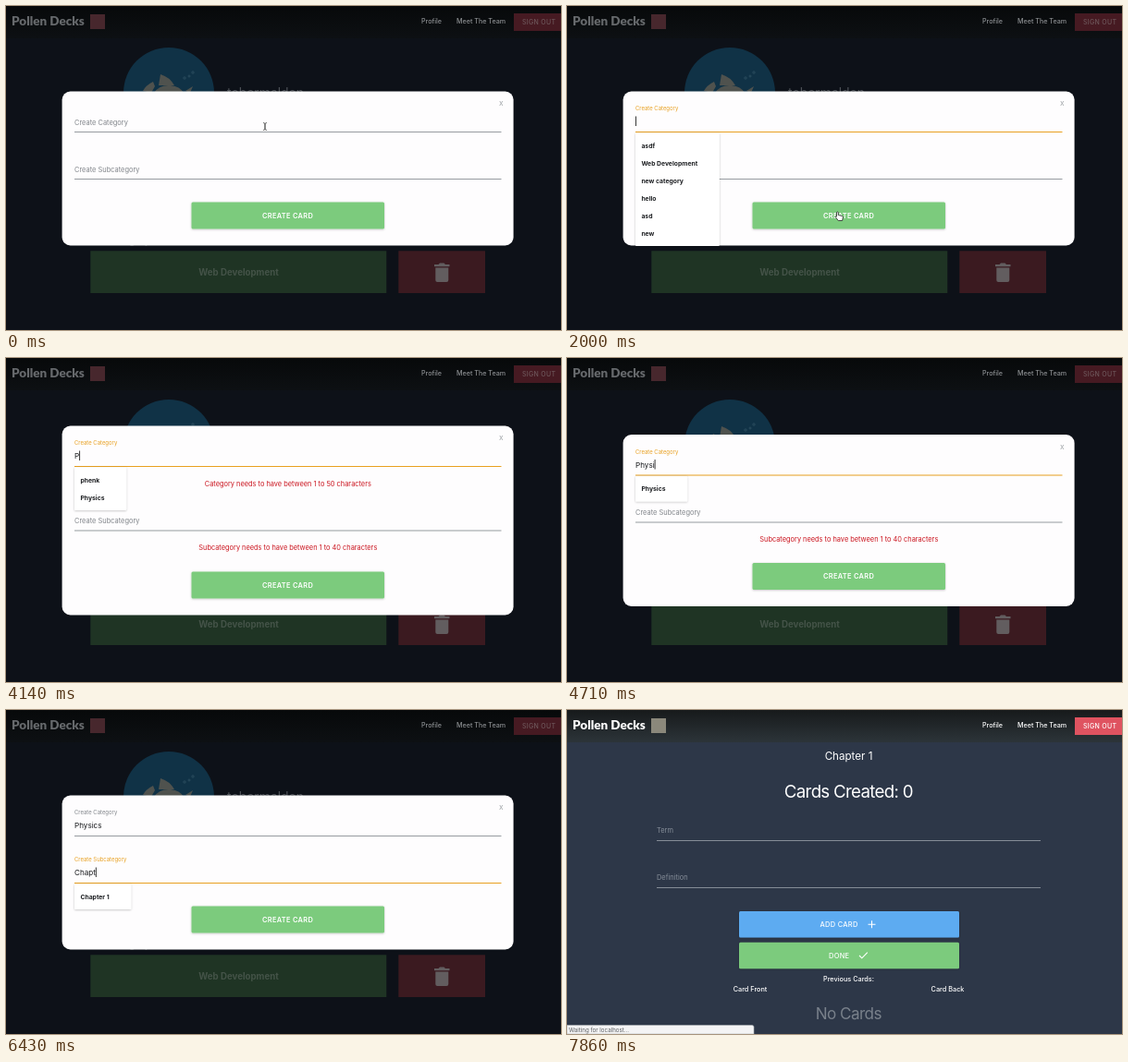
Recreate the animation shown at these times as an HTML page. Size 600 by 351 pixels, loop 8 s.

```html
<!DOCTYPE html>
<html lang="en">
<head>
<meta charset="utf-8">
<title>Create a card</title>
<style>
html, body { margin: 0; width: 100%; height: 100%; overflow: hidden; background: #0d1118; }
svg { display: block; width: 100%; height: 100%; font-family: Inter, "Open Sans", sans-serif; font-size: 7.45px; }
.logo { font: 900 13.5px Lato, sans-serif; }
.nav { font-size: 7.15px; font-weight: 500; }
.caps { font-weight: 500; letter-spacing: .3px; }
.mid { text-anchor: middle; }
.input { font-size: 8.1px; white-space: pre; fill: #16181b; }
.error { font-size: 7.4px; fill: #cb1620; }
.list { font-size: 6.8px; font-weight: 700; fill: #1d1f22; }
</style>
</head>
<body>
<svg id="stage" viewBox="0 0 600 351">
  <defs>
    <linearGradient id="bar" x2="0" y2="1"><stop stop-color="#171a1b"/><stop offset="1" stop-color="#2c3439"/></linearGradient>
    <linearGradient id="barDim" x2="0" y2="1"><stop stop-color="#07090a"/><stop offset="1" stop-color="#0d1013"/></linearGradient>
    <filter id="shade" x="-10%" y="-20%" width="120%" height="150%"><feDropShadow dx="0" dy=".6" stdDeviation=".8" flood-opacity=".26"/></filter>
  </defs>

  <g id="home">
    <rect width="600" height="351" fill="#0d1118"/>
    <rect width="600" height="35" fill="url(#barDim)"/>
    <text class="logo" x="6" y="21" fill="#66696c">Pollen Decks</text>
    <rect x="91" y="9" width="16" height="16" fill="#47272d"/>
    <g class="nav" fill="#8b8e91"><text x="449" y="19.4">Profile</text><text x="487" y="19.4">Meet The Team</text></g>
    <rect x="549" y="8" width="51" height="19" fill="#461a22"/>
    <text class="caps" style="font-size:7px" x="558" y="20" fill="#6d565a">SIGN OUT</text>
    <circle cx="176" cy="94" r="49" fill="#103246"/>
    <path d="M167 74q10 3 15 12h-17zM148 92q3-6 11-10l2 5-4 7zM160 94q6-9 18-8 10 1 14 8zM194 92l8-5-3 7z" fill="#4f524e"/>
    <g fill="none" stroke="#2f5163" stroke-width=".8"><circle cx="193" cy="78" r="1.2"/><circle cx="198" cy="76" r="1"/><circle cx="202" cy="72" r="1.2"/></g>
    <text x="239" y="98.8" font-size="13.9" fill="#4d5157">tobermalden</text>
    <text x="110" y="258.3" font-size="10.5" fill="#4a4e53">Category</text>
    <rect x="91.300" y="265.300" width="320" height="45.700" fill="#1f3424"/>
    <text class="mid" x="251.5" y="292" font-size="9.7" font-weight="700" fill="#445348">Web Development</text>
    <rect x="424.300" y="265.300" width="93.700" height="45.700" fill="#3b1a20"/>
    <path d="M463 280h4.500l1.500-1.500h4.500l1.500 1.500h4.500v2.200h-16.500zM464.300 283.500h14v13.500q0 2-2 2h-10q-2 0-2-2z" fill="#625d5f"/>
  </g>

  <g id="modal">
    <rect id="panel" x="60.600" width="488" rx="9" fill="#fefdfe"/>
    <text id="close" class="mid" x="535.3" font-size="8.5" fill="#a3a7ab">x</text>
    <g id="fields"></g>
    <g id="create">
      <rect x="200.500" width="208.500" height="29" rx="1.500" fill="#7ccb7d" filter="url(#shade)"/>
      <text class="caps mid" style="font-weight:600" x="304.600" y="17.300" fill="#fff">CREATE CARD</text>
    </g>
    <g id="drop" class="list"></g>
  </g>

  <g id="deck">
    <rect width="600" height="351" fill="#2d3748"/>
    <rect width="600" height="35" fill="url(#bar)"/>
    <text class="logo" x="6" y="21" fill="#fff">Pollen Decks</text>
    <rect x="91" y="9" width="16" height="16" fill="#8b887b"/>
    <g class="nav" fill="#fff"><text x="449" y="19.400">Profile</text><text x="487" y="19.400">Meet The Team</text></g>
    <rect x="549" y="8" width="51" height="19" fill="#df5360"/>
    <text class="caps" style="font-size:7px" x="558" y="20" fill="#fff">SIGN OUT</text>
    <g class="mid" fill="#fff">
      <text x="304.500" y="54" font-size="11.600">Chapter 1</text>
      <text x="304.300" y="94.800" font-size="18.700" letter-spacing="-.7">Cards Created: 0</text>
    </g>
    <g fill="#868e99"><text x="97" y="133.400">Term</text><text x="97" y="184.200">Definition</text></g>
    <path d="M97 141.500h415M97 192.500h415" stroke="#858d97"/>
    <g filter="url(#shade)">
      <rect x="186" y="218" width="238" height="28.500" rx="1.500" fill="#5dabf1"/>
      <rect x="186" y="251.700" width="238" height="28.500" rx="1.500" fill="#7ccb7d"/>
    </g>
    <g class="caps" fill="#fff"><text x="273.500" y="235">ADD CARD</text><text x="283" y="268.800">DONE</text></g>
    <path d="M325.500 232.300h8M329.500 228.300v8M316 266l2.800 2.800 6-6.200" fill="none" stroke="#fff" stroke-width="1.100"/>
    <g class="mid" font-weight="500" font-size="7.300" fill="#fff">
      <text x="304.500" y="294">Previous Cards:</text><text x="198" y="304.800">Card Front</text><text x="411.500" y="304.800">Card Back</text>
    </g>
    <text class="mid" x="304.300" y="335" font-size="17.100" letter-spacing="-.55" fill="#79818b">No Cards</text>
    <path d="M0 341.500h200q2 0 2 2V351H0z" fill="#f4f4f5" stroke="#aeb2b6" stroke-width=".6"/>
    <text x="2" y="349" font-size="6.200" fill="#5c5f62">Waiting for localhost...</text>
  </g>

  <path id="beam" d="M-2-4q2 0 2 1.500v5q0 1.500-2 1.500M2-4q-2 0-2 1.500v5q0 1.500 2 1.500" fill="none" stroke="#333" stroke-width=".7"/>
  <path id="hand" d="M-2.500-4.500q1-1 1.800 0v3l4.200 1q1 .4.900 1.500l-.8 3.500h-4.300l-3.200-4q.2-1.300 1.400-.4z" fill="#fff" stroke="#222" stroke-width=".8"/>
</svg>
<script>
const LOOP = 8000, SWITCH = 7860, ERR = 19;
const $ = id => document.getElementById(id);

// step tables: [ms, value]
const catKeys = [[0, ""], [4000, "P"], [4290, "Ph"], [4430, "Phy"], [4570, "Phys"], [4710, "Physi"], [4860, "Physic"], [5000, "Physics"]];
const subKeys = [[0, ""], [5570, "C"], [5860, "Ch"], [6000, "Cha"], [6140, "Chap"], [6430, "Chapt"], [6860, "Chapte"], [7000, "Chapter"], [7290, "Chapter "], [7430, "Chapter 1"]];
const catError = [[0, 0], [2290, 1], [4290, 0]];
const subError = [[0, 0], [2290, 1], [5860, 0]];
const all = ["asdf", "Web Development", "new category", "hello", "asd", "new"];
const lists = [[0, []], [860, all], [2140, []], [4000, ["phenk", "Physics"]], [4430, ["Physics"]], [5140, []],
  [5570, ["card", "Chapter 1"]], [5860, ["Chapter 1"]]];
const focusStarts = [[0, 0], [570, 570], [2570, 2570], [5140, 5140]];

// eased tables: [ms, value, ...]
const catFocus = [[0, 0], [570, 0], [770, 1], [2140, 1], [2290, 0], [2570, 0], [2770, 1], [5140, 1], [5340, 0]];
const catFloat = [[0, 0], [570, 0], [770, 1], [2140, 1], [2290, 0], [2570, 0], [2770, 1]];
const subFocus = [[0, 0], [5140, 0], [5340, 1]];
const catBlush = [[0, 0], [2430, 0], [2570, 1], [2770, 0]];
const mouse = [[0, 280, 130.500], [140, 280, 130.500], [290, 270, 128], [1290, 270, 128], [1860, 294, 228], [2290, 294, 228],
  [2560, 268, 101], [3290, 268, 101], [4000, 262, 104]];

const step = (table, t) => table.findLast(k => k[0] <= t);
const held = (table, t) => step(table, t)[1];
const lerp = (a, b, k) => a + (b - a) * k;
const mix = (a, b, k) => `rgb(${a.map((v, i) => Math.round(lerp(v, b[i], k)))})`;

function ease(table, t) {
  const i = table.findLastIndex(k => k[0] <= t), a = table[i], b = table[i + 1] || a;
  const u = a === b ? 0 : (t - a[0]) / (b[0] - a[0]), k = u * u * (3 - 2 * u);
  return a.slice(1).map((v, n) => lerp(v, b[n + 1], k));
}

function set(el, attrs) {
  for (const name in attrs) el.setAttribute(name, attrs[name]);
}

function makeField(name, limit) {
  const g = document.createElementNS("http://www.w3.org/2000/svg", "g");
  g.innerHTML = `<text x="74">Create ${name}</text><text class="input" x="74" y="35"></text>
    <rect x="74" y="43" width="461.5" height="1"/><rect width=".9" height="10.5" y="26.5" fill="#222"/>
    <text class="error mid" x="304.8" y="64.6">${name} needs to have between 1 to ${limit} characters</text>`;
  $("fields").append(g);
  const [label, input, line, caret, error] = g.children;
  return { g, label, input, line, caret, error };
}

const cat = makeField("Category", 50), sub = makeField("Subcategory", 40);
const grey = [128, 133, 138], rule = [150, 155, 160], amber = [232, 160, 32], rose = [224, 140, 132];

function drawField(f, y, s) {
  set(f.g, { transform: `translate(0 ${y})` });
  set(f.label, { y: lerp(35.6, 20.2, s.float), "font-size": lerp(7.45, 5.95, s.float), fill: mix(grey, amber, s.focus) });
  if (f.input.textContent !== s.text) f.input.textContent = s.text;
  set(f.line, { fill: s.blush ? mix(rule, rose, s.blush) : mix(rule, amber, s.focus) });
  const w = s.text ? f.input.getComputedTextLength() : 0;
  set(f.caret, { x: 74 + w, visibility: s.caret ? "inherit" : "hidden" });
  set(f.error, { visibility: s.error ? "inherit" : "hidden" });
}

let shown = null;
function drawList(items, y) {
  const drop = $("drop");
  set(drop, { transform: `translate(74 ${y})` });
  if (items === shown) return;
  shown = items;
  drop.innerHTML = items.length ? `<rect filter="url(#shade)" rx="1" fill="#fff" height="${items.length * 19 + 8.5}"/>` +
    items.map((s, i) => `<text x="6.4" y="${16.4 + i * 19}">${s}</text>`).join("") : "";
  const widths = [...drop.querySelectorAll("text")].map(e => e.getComputedTextLength());
  if (items.length) set(drop.firstChild, { width: Math.max(...widths) + 30 });
}

function render(t) {
  const done = t >= SWITCH;
  set($("deck"), { visibility: done ? "visible" : "hidden" });

  const ce = held(catError, t), se = held(subError, t), n = ce + se;
  const top = [93, 83.500, 74][n], subTop = top + 51 + ce * 18.500;
  set($("panel"), { y: top - .500, height: 167 + n * ERR });
  set($("close"), { y: top + 15 });
  set($("create"), { transform: `translate(0 ${top + 119.500 + n * ERR})` });

  const inSub = t >= 5140, inCat = !inSub && (t >= 2570 || t >= 570 && t < 2140);
  const keys = inSub ? subKeys : catKeys;
  const since = Math.max(held(focusStarts, t), step(keys, t)[0]);
  const blink = (t - since) % 1000 < 500;

  drawField(cat, top, { text: held(catKeys, t), float: ease(catFloat, t)[0], focus: ease(catFocus, t)[0],
    blush: ease(catBlush, t)[0], caret: inCat && blink, error: ce });
  const k = ease(subFocus, t)[0];
  drawField(sub, subTop, { text: held(subKeys, t), float: k, focus: k, blush: 0, caret: inSub && blink, error: se });
  drawList(held(lists, t), (inSub ? subTop : top) + 44.600);

  const [x, y] = ease(mouse, t), onButton = y > 205, active = t < 4000;
  set($("beam"), { transform: `translate(${x} ${y})`, visibility: active && !onButton ? "visible" : "hidden" });
  set($("hand"), { transform: `translate(${x} ${y})`, visibility: active && onButton ? "visible" : "hidden" });
}

const start = performance.now();
function tick() {
  render((performance.now() - start) % LOOP);
  requestAnimationFrame(tick);
}
tick();
</script>
</body>
</html>
```
